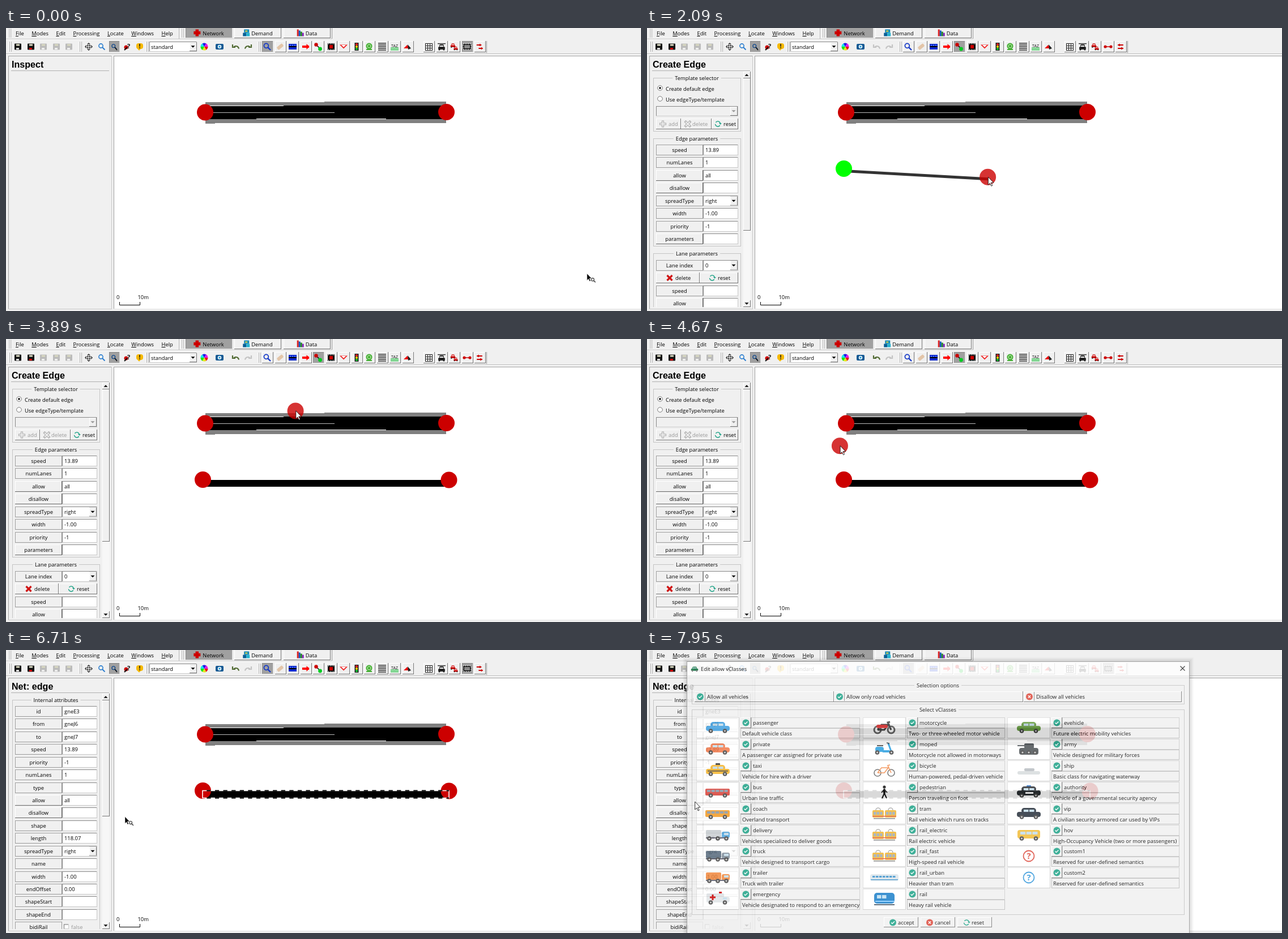
An HTML page with a canvas that plays this animation: 1121 by 500 pixels, repeating every 8000 ms.

```html
<!DOCTYPE html>
<html lang="en">
<head>
<meta charset="utf-8">
<title>Network editor</title>
<style>
html, body { margin: 0; width: 100%; height: 100%; overflow: hidden; background: #f0f0f0 }
canvas { display: block }
</style>
</head>
<body>
<canvas id="stage" width="1121" height="500"></canvas>
<script>
const LOOP = 8000, FACE = '#f0f0f0', GRAY = '#a0a0a0', RED = '#c00', TEAL = '#1fa388', INK = '#222';
const font = (size, family = 'Open Sans') => `${size}px "${family}", sans-serif`;
const UI = font(9.4);
const screen2d = document.getElementById('stage').getContext('2d');
let g = screen2d;

// ---- drawing helpers ----
const rect = (x, y, w, h, c) => { g.fillStyle = c; g.fillRect(x, y, w, h); };
const block = (x, y, w, h, c, r = 2) => { g.fillStyle = c; g.beginPath(); g.roundRect(x, y, w, h, r); g.fill(); };
const disc = (x, y, r, c) => { g.fillStyle = c; g.beginPath(); g.arc(x, y, r, 0, 7); g.fill(); };
const ring = (x, y, r, c, w = 1, from = 0, to = 7) => {
  g.strokeStyle = c; g.lineWidth = w; g.beginPath(); g.arc(x, y, r, from, to); g.stroke();
};
const trace = p => { g.beginPath(); for (let i = 0; i < p.length; i += 2) g.lineTo(p[i], p[i + 1]); };
const poly = (c, ...p) => { trace(p); g.fillStyle = c; g.fill(); };
const line = (c, w, ...p) => { trace(p); g.strokeStyle = c; g.lineWidth = w; g.stroke(); };
const text = (s, x, y, c = '#000', align = 'left', face = UI) => {
  g.font = face; g.textAlign = align; g.fillStyle = c; g.fillText(s, x, y + 3.5);
};
const at = (x, y, draw, sx = 1, sy = sx) => { g.save(); g.translate(x, y); g.scale(sx, sy); draw(); g.restore(); };
const repeat = (n, draw) => { for (let i = 0; i < n; i++) draw(i); };
const box = (x, y, w, h, fill, tl = GRAY, br = '#ccc') => {
  rect(x, y, w, h, br); rect(x, y, w - 1, h - 1, tl); rect(x + 1, y + 1, w - 2, h - 2, fill);
};
const button = (x, y, w, h, down) =>
  down ? box(x, y, w, h, GRAY, '#888', '#ddd') : box(x, y, w, h, FACE, '#fff', '#777');
const group = (title, x, y, w, h) => {
  g.strokeStyle = '#c4c4c4'; g.lineWidth = 1; g.strokeRect(x + .5, y + .5, w, h);
  g.font = UI;
  const gap = g.measureText(title).width + 8, cx = x + w / 2;
  rect(cx - gap / 2, y - 2, gap, 5, FACE);
  text(title, cx, y, '#000', 'center');
};
const triangle = (x, y, dir, c = '#000', r = 3.5) => poly(c, x - r, y - dir * r / 2, x + r, y - dir * r / 2, x, y + dir * r / 2);
const dropdown = (x, y, c) => { box(x, y - 8, 13, 16, FACE, '#fff', '#777'); triangle(x + 6, y, 1, c); };
const cross = (x, y, r, c, w) => { line(c, w, x - r, y - r, x + r, y + r); line(c, w, x - r, y + r, x + r, y - r); };
const plus = (x, y, r, c, w) => { line(c, w, x - r, y, x + r, y); line(c, w, x, y - r, x, y + r); };
const check = (x, y) => { disc(x, y, 6, TEAL); line('#fff', 1.3, x - 3, y, x - 1, y + 2, x + 3, y - 2); };
const refuse = (x, y) => { disc(x, y, 6, '#dc4a3d'); cross(x, y, 2.2, '#fff', 1.3); };
const reload = (x, y) => {
  ring(x, y, 4.5, TEAL, 1.5, .6, 3.1); ring(x, y, 4.5, TEAL, 1.5, 3.8, 6.2);
  triangle(x + 4.5, y, 1, TEAL, 2.5);
};

// ---- toolbar icons, drawn around their centre ----
const lens = (c, s = 1) => () => { ring(-1.5 * s, -1.5 * s, 3.6 * s, c, 1.6 * s); line(c, 2 * s, s, s, 5.5 * s, 5.5 * s); };
const floppy = (c, mark) => () => { block(-6, -5.5, 12, 11, c, 1); rect(-3, -4.5, 6, 3, '#d8d8c0'); rect(-3, 2, 5, 3, mark); };
const saved = floppy('#bbb', '#eee');
const arrow = (c, dir = 1) => () => { rect(-6, -2, 12, 4, c); at(4 * dir, 0, () => { g.rotate(-dir * Math.PI / 2); triangle(0, 0, 1, c, 5); }); };
const curl = (c, dir) => () => at(0, 0, () => { ring(1, 4, 5, c, 2.2, 3.7, 6.2); line(c, 2.2, -5, -4, -5, 1, 0, 1); }, dir, 1);
const vehicleIcon = c => () => { block(-6, -1, 12, 5, c); block(-4, -5, 8, 5, c); rect(-3, -3, 6, 2, '#fff'); disc(-4, 4, 1.6, INK); disc(4, 4, 1.6, INK); };
const stripes = (n, step, c) => repeat(n, i => rect(-7, (i - (n - 1) / 2) * step - .7, 14, 1.4, c));

const fileIcons = [floppy('#111', '#ddd'), floppy('#111', RED), saved, saved, saved];
const viewIcons = [
  () => { repeat(4, () => { g.rotate(Math.PI / 2); triangle(0, -5.5, -1, INK, 3); }); disc(0, 0, 3.5, INK); plus(0, 0, 5, '#fff', 1.2); },
  lens('#2d7fd0'),
  () => { box(-9, -10, 19, 20, GRAY, '#888', '#ddd'); lens('#124a8c', .8)(); line('#111', 1.5, 1, 1, 5, 6); },
  () => { disc(-2, 1, 3.5, RED); line('#111', 2, -5, 6, 0, 1); text('?', 0, -1, '#111', 'left', 'bold ' + font(11)); },
  () => { block(-6, -6, 12, 10, '#f5b800', 4); triangle(-1, 5, 1, '#f5b800'); rect(-.8, -5, 1.6, 5, INK); disc(0, 2, 1, INK); },
];
const modeIcons = [
  lens('#1438c8', 1.1),
  () => { g.rotate(-.7); block(-6, -3, 12, 6, '#e3c5a8'); },
  () => { rect(-7, -5, 14, 10, '#0a2ad0'); rect(-7, -1, 14, 2, '#000'); repeat(3, i => rect(i * 4 - 5, -3, 2, 1, '#8af')); },
  arrow('#f00'),
  () => { line('#000', 1.5, -4, -4, 4, 4); disc(-3.5, -3.5, 3.2, RED); disc(3.5, 4, 3.4, '#0c2'); },
  () => { rect(-6, -6, 12, 12, '#000'); rect(-3, -3, 6, 6, RED); repeat(4, i => { rect(i * 3 - 5, -6, 1, 2, '#fff'); rect(i * 3 - 5, 4, 1, 2, '#fff'); }); },
  () => { triangle(0, 0, 1, '#e22', 7); triangle(0, -1, 1, '#fff', 4); },
  () => { rect(-3.5, -7, 7, 14, INK); ['#f22', '#fd0', '#1c3'].forEach((c, i) => disc(0, i * 4 - 4, 2, c)); },
  () => { disc(0, -1, 5.5, '#45b035'); ring(0, -1, 3, '#d4f0c4', 1); rect(-5, 4, 10, 2, '#45b035'); },
  () => stripes(5, 3, INK),
  () => { text('TAZ', 0, -3, '#111', 'center', font(7)); at(0, 4, () => stripes(2, 3, '#1b3')); },
  () => { triangle(-1, 0, -1, '#e11', 6); poly(INK, 0, -4, 6, 3, 1, 5); },
];
const gridIcons = [
  () => repeat(4, i => { rect(i * 4 - 6, -6, 1, 13, INK); rect(-6, i * 4 - 6, 13, 1, INK); }),
  () => { at(0, 1, vehicleIcon(INK)); rect(-7, -6, 14, 1.3, INK); },
  () => { at(-2, -2, vehicleIcon(RED), .7); at(3, 3, vehicleIcon(RED), .6); },
];
const inspectIcons = [
  () => { rect(-7, -5, 14, 10, '#111'); rect(-5, -3, 10, 6, '#888'); g.setLineDash([2, 2]); g.strokeStyle = '#fff'; g.lineWidth = 1; g.strokeRect(-7, -5, 14, 10); },
  () => { at(-1, -3, arrow(RED), .7, .5); at(2, 3, arrow(RED), .6, .5); },
];
const edgeIcons = [
  () => { line(RED, 1.5, -5, 0, 5, 0); disc(-5, 0, 2.6, RED); disc(5, 0, 2.6, RED); },
  () => { at(0, -3, arrow(RED, -1), .8, .5); at(0, 3, arrow(RED), .8, .5); },
];
const colorWheel = () => repeat(6, i => {
  g.fillStyle = `hsl(${i * 60}, 80%, 50%)`; g.beginPath(); g.moveTo(0, 0); g.arc(0, 0, 6.5, i * 1.047, i * 1.047 + 1.06); g.fill();
});
const camera = () => { block(-7, -5, 14, 10, '#155a94'); disc(0, 0, 3.2, '#fff'); disc(0, 0, 1.8, '#29a3dc'); };
const tabs = {
  Network: () => plus(0, 0, 6, RED, 5.5),
  Demand: () => { rect(-3, -6, 9, 6, '#1188b8'); rect(-5, 0, 6, 6, '#0a5f96'); rect(1, 0, 6, 6, '#25b2cf'); rect(-1, -4, 4, 2, '#ffd83a'); },
  Data: () => ['#d22', '#15b', '#282', '#82b'].forEach((c, i) => rect(i * 3 - 5, i * 2 - 6, 3, 12 - i * 2, c)),
};
const grip = (x, y, h) => repeat(2, i => { rect(x + i * 3, y, 1, h, '#fff'); rect(x + i * 3 + 1, y, 1, h, '#aaa'); });
const iconRow = (x, icons, active) => icons.forEach((draw, i) => {
  const cx = Math.round(x + i * 22.5);
  if (active !== undefined) button(cx - 9, 23, 20, 20, i === active);
  at(cx, 33, draw);
});

function drawToolbars(creating, canUndo, canRedo) {
  rect(0, 0, 1121, 500, FACE);
  rect(0, 19, 575, 1, '#c8c8c8'); rect(0, 20, 575, 1, '#fff');
  rect(0, 45, 1121, 1, '#b8b8b8'); rect(0, 46, 1121, 1, '#fff');
  grip(4, 1, 16); grip(309, 1, 16); rect(305, 0, 1, 19, '#b8b8b8'); rect(575, 0, 1, 19, '#999');
  for (const x of [5, 129, 247, 445]) grip(x, 24, 18);
  rect(848, 23, 1, 21, '#999');
  let menuX = 17;
  for (const s of ['File', 'Modes', 'Edit', 'Processing', 'Locate', 'Windows', 'Help']) {
    text(s, menuX, 9); rect(menuX, 14, g.measureText(s[0]).width, 1, '#000');
    menuX += g.measureText(s).width + 13.5;
  }
  Object.entries(tabs).forEach(([s, icon], i) => {
    const x = Math.round(317 + i * 86.4), cx = x + 49;
    button(x, -1, 83, 19, !i);
    text(s, cx, 9, '#000', 'center');
    at(cx - g.measureText(s).width / 2 - 10, 8.5, icon);
  });
  iconRow(21, fileIcons); iconRow(146, viewIcons);
  box(253, 24, 84, 18, '#fff', '#888'); text('standard', 256, 33); dropdown(324, 33);
  at(350, 33, colorWheel); at(377, 33, camera);
  const undoColor = on => on ? '#526b34' : '#c4c4c4';
  iconRow(405, [curl(undoColor(canUndo), 1), curl(undoColor(canRedo), -1)]);
  iconRow(461, modeIcons, creating ? 4 : 0);
  iconRow(746, [...gridIcons, ...(creating ? edgeIcons : inspectIcons)], creating ? -1 : 3);
}

// ---- side panel ----
function row(y, label, value = '', kind = '', down = false) {
  const raised = kind === 'button' && !down;
  box(16, y - 9.5, 83, 19, FACE, raised ? '#fff' : GRAY, raised ? '#666' : '#999');
  text(label, 57.5 + down, y + down, '#000', 'center');
  if (kind === 'check') { box(102, y - 5, 9, 9, '#fff', '#777'); text(value, 115, y, '#999'); return; }
  box(99, y - 9.5, 62, 19, '#fff', '#888', '#c8c8c8');
  text(value, 103, y);
  if (kind === 'combo') dropdown(147, y);
}
const rows = (y, list, pressed) => list.forEach((entry, i) => {
  const [label, value, kind] = entry.split('|');
  row(Math.round(y + i * 22.43) + .5, label, value, kind, label === pressed);
});
function createPanel() {
  group('Template selector', 11, 88, 154, 94);
  ['Create default edge', 'Use edgeType/template'].forEach((s, i) => {
    const y = 107 + i * 19;
    disc(23, y - 1, 4.5, '#fff'); ring(23, y - 1, 4.3, '#777'); if (!i) disc(23, y - 1, 1.8, '#000');
    text(s, 33, y);
  });
  box(16, 138, 145, 18, FACE, '#888'); dropdown(147, 147, '#999');
  button(16, 160, 44, 19); button(60, 160, 54, 19); button(114, 160, 47, 19);
  for (const [w, c] of [[4, '#aaa'], [2, '#eee']]) { plus(28, 169.5, 4 + w / 2, c, w); cross(72, 169.5, 3 + w / 2, c, w); }
  reload(125, 169.5);
  text('add', 38, 169.5, '#999'); text('delete', 80, 169.5, '#999'); text('reset', 135, 169.5);
  group('Edge parameters', 11, 195, 154, 190);
  rows(215, ['speed|13.89', 'numLanes|1', 'allow|all|button', 'disallow||button', 'spreadType|right|combo', 'width|-1.00', 'priority|-1', 'parameters||button']);
  group('Lane parameters', 11, 398, 154, 130);
  rows(419, ['Lane index|0|combo']);
  button(16, 432, 77, 19); button(93, 432, 68, 19);
  cross(40, 441.5, 4.5, '#d01515', 3.2); reload(115, 441.5);
  text('delete', 50, 441.5); text('reset', 125, 441.5);
  rows(463.6, ['speed', 'allow||button']);
}
function edgePanel(pressed) {
  group('Internal attributes', 11, 88, 154, 440);
  rows(108, ['id|gneE3', 'from|gneJ6', 'to|gneJ7', 'speed|13.89', 'priority|-1', 'numLanes|1', 'type', 'allow|all|button', 'disallow||button',
    'shape', 'length|118.07', 'spreadType|right|combo', 'name', 'width|-1.00', 'endOffset|0.00', 'shapeStart', 'shapeEnd', 'bidiRail|false|check'], pressed);
}
function drawPanel(creating, selected, pressed) {
  box(4, 49, 183, 448, FACE, GRAY, '#c8c8c8');
  text(creating ? 'Create Edge' : selected ? 'Net: edge' : 'Inspect', 10, 66.5, '#000', 'left', 'bold ' + font(16.1, 'Liberation Sans'));
  rect(9, 75, 173, 1, '#b0b0b0');
  if (!creating && !selected) return;
  g.save(); g.beginPath(); g.rect(5, 77, 181, 416); g.clip();
  creating ? createPanel() : edgePanel(pressed);
  rect(170, 77, 13, 416, '#f7f7f7');
  button(170, 77, 13, 12); triangle(176, 83, -1);
  button(170, 89, 13, creating ? 269 : 205);
  button(170, 481, 13, 12); triangle(176, 487, 1);
  g.restore();
}

// ---- network view ----
const NODE_R = 14.5, START = [347.5, 248.5], END = [782, 249];
const node = (x, y, c = RED) => disc(x, y, NODE_R, c);
function drawNetwork(drawing, built, selected, x, y) {
  box(190, 49, 932, 448, '#fff', GRAY, '#e3e3e3');
  rect(352, 131, 425, 37, '#808080'); rect(562, 130, 215, 1, '#808080'); rect(352, 168, 17, 1, '#808080');
  rect(352, 137, 425, 24, '#000');
  rect(352, 137, 138, 1, '#fff'); rect(442, 160, 229, 1, '#fff'); rect(365, 149, 215, 1, '#bbb');
  node(351.5, 149); node(777.5, 148.5);
  if (drawing) { line('#333', 5, START[0], START[1] + 4, x, y + 3.5); node(...START, '#0f0'); }
  if (built) { rect(347, 249, 435, 12, '#000'); node(...START); node(...END); }
  if (selected) {
    g.strokeStyle = '#fff'; g.lineWidth = 1.6; g.strokeRect(347, 248.5, 435, 13);
    g.setLineDash([7.3, 7.3]); g.lineDashOffset = -7.3;
    for (const edgeY of [248.5, 261.5]) line('#000', 2, 347, edgeY, 782, edgeY);
    g.setLineDash([]);
  }
  line('#000', 1, 200.5, 484, 200.5, 489.5, 236.5, 489.5, 236.5, 484);
  text('0', 195, 475.5); text('10m', 232.5, 475.5);
}
function drawCursor(x, y, inspecting) {
  at(x + .7, y, () => {
    if (inspecting) at(11, 11.5, lens('#333', .7));
    const s = inspecting ? .85 : 1;
    g.scale(s, s);
    const shape = [0, 0, 0, 14, 3, 11, 5.5, 16, 7.5, 15, 5, 10, 9.5, 10, 0, 0];
    poly(inspecting ? '#000' : '#fff', ...shape);
    line(inspecting ? '#fff' : '#000', inspecting ? .5 : .8, ...shape);
  });
}

// ---- vehicle class dialog: every vehicle is built from blocks, panes and wheels ----
const GLASS = '#c4dcea';
const wheels = (n = 2, span = 25) => repeat(n, i => { const x = span * (i / (n - 1) - .5); disc(x, 6, 3.8, '#444'); disc(x, 6, 1.6, '#ccc'); });
const panes = (n, x, y, w, h, c = GLASS) => repeat(n, i => rect(x + i * w / n, y, w / n - 1.5, h, c));
const car = c => { block(-21, -3, 42, 9, c, 4); block(-13, -10, 26, 10, c, 5); panes(2, -9, -7, 20, 4); wheels(); };
const truck = (cargo, cab) => { block(-21, -9, 27, 13, cargo); block(7, -6, 14, 11, cab, 3); rect(11, -4, 8, 4, GLASS); rect(-21, 4, 40, 2, '#556'); wheels(3, 30); };
const vehicles = {
  car,
  taxi(c) { block(-4, -13, 8, 4, '#333', 1); car(c); rect(-18, 0, 36, 1.5, '#333'); },
  police(c) { block(-4, -12, 8, 3, '#37c', 1); car(c); rect(-6, 0, 14, 3, '#fff'); },
  bus(c) { block(-22, -6, 43, 12, c); panes(5, -19, -4, 38, 4, '#8595a5'); wheels(); },
  van(c) { block(-20, -9, 40, 15, c, 4); panes(3, -15, -6, 32, 5); wheels(); },
  delivery(c) { truck('#c9ced2', c); },
  truck(c) { truck(c, '#7f8d9b'); },
  trailer(c) { truck(c, c); },
  ambulance() { block(-20, -10, 31, 16, '#e0e4e7'); block(5, -4, 16, 10, '#e0e4e7', 4); plus(-9, -3, 5, RED, 3); rect(9, -3, 7, 4, GLASS); rect(2, -13, 5, 3, RED); wheels(); },
  cycle(c, w = 1.6) { for (const x of [-12, 12]) ring(x, 4, 6, '#666', w); line(c, w, -12, 4, -5, -5, 7, -5, 0, 4, -12, 4); line(c, w, 12, 4, 6, -9, 10, -10); },
  motor(c) { this.cycle('#444', 3); block(-14, -5, 20, 6, c, 3); },
  moped(c) { block(-16, -4, 15, 9, c, 4); block(-4, 2, 14, 4, c); line(c, 3, 7, -10, 12, 4); rect(-13, -7, 11, 2, '#444'); line('#444', 1.5, 4, -11, 9, -10); wheels(); },
  person() { disc(0, -9, 2.6, '#111'); block(-2, -6, 4, 9, '#111'); line('#111', 2, -4, 11, 0, 2, 4, 11); line('#111', 1.6, -5, 1, 0, -5, 5, 1); },
  tram(c) { for (const x of [-21, 1]) { block(x, -6, 20, 13, c); panes(3, x + 2, -3, 17, 5, '#9ab'); ring(x + 10, -6, 4, '#777', 1, 3.1, 6.3); } rect(-21, 4, 42, 1.5, '#d54'); rect(-19, 8, 38, 1.5, '#777'); },
  urban(c) { block(-25, -6, 50, 12, '#dde6eb', 4); panes(7, -21, -3, 42, 3, c); rect(-24, 3, 48, 1.5, c); },
  rail(c) { block(-18, -11, 36, 19, c, 5); panes(2, -13, -7, 18, 6, '#bfe0f3'); rect(-16, 3, 34, 2, '#8cf'); rect(-18, 9, 36, 2, '#456'); },
  tank(c) { block(-17, -2, 34, 12, c, 4); block(-8, -10, 17, 9, c); rect(-20, -7, 14, 2, c); wheels(3, 22); },
  ship(c) { block(-20, 1, 40, 6, c, 3); block(-8, -4, 18, 5, '#b9bec2'); },
  custom(c) { ring(0, 0, 9.5, c, 1.8); text('?', 0, 1.5, c, 'center', 'bold ' + font(15)); },
};
const classes = [
  [87, 376, `passenger|Default vehicle class|car|#3f9fe0
private|A passenger car assigned for private use|car|#f27a4b
taxi|Vehicle for hire with a driver|taxi|#f5b52b
bus|Urban line traffic|bus|#dd4339
coach|Overland transport|bus|#f29a22
delivery|Vehicles specialized to deliver goods|delivery|#4ba3dc
truck|Vehicle designed to transport cargo|truck|#56697c
trailer|Truck with trailer|trailer|#f0883d
emergency|Vehicle designated to respond to an emergency|ambulance|#fff`],
  [381, 632, `motorcycle|Two- or three-wheeled motor vehicle|motor|#d33
moped|Motorcycle not allowed in motorways|moped|#2b9fe0
bicycle|Human-powered, pedal-driven vehicle|cycle|#f28a4a
pedestrian|Person traveling on foot|person|#111
tram|Rail vehicle which runs on tracks|tram|#f2b632
rail_electric|Rail electric vehicle|tram|#f2b632
rail_fast|High-speed rail vehicle|tram|#f2b632
rail_urban|Heavier than tram|urban|#3c92cc
rail|Heavy rail vehicle|rail|#1c7fc9`],
  [636, 940, `evehicle|Future electric mobility vehicles|car|#6a9f45
army|Vehicle designed for military forces|tank|#4d5357
ship|Basic class for navigating waterway|ship|#d8dcde
authority|Vehicle of a governmental security agency|police|#2b2f33
vip|A civilian security armored car used by VIPs|car|#26303c
hov|High-Occupancy Vehicle (two or more passengers)|van|#f2bd3a
custom1|Reserved for user-defined semantics|custom|#dc4a3d
custom2|Reserved for user-defined semantics|custom|#3498db`],
];
const DIALOG = { x: 70, y: 20, w: 888, h: 490 };
function makeDialog() {
  const layer = document.createElement('canvas');
  layer.width = 1121; layer.height = 500;
  g = layer.getContext('2d');
  const { x: left, y: top, w, h } = DIALOG;
  repeat(7, i => { g.strokeStyle = `rgba(0,0,0,${.14 - i * .02})`; g.strokeRect(left - i - .5, top - i - .5, w + 2 * i + 1, h); });
  box(left, top, w, h, FACE, '#999', '#999'); rect(left + 1, top + 1, w - 2, 24, '#fff');
  at(84, 34, () => car('#174'), .3, .45);
  text('Edit allow vClasses', 95, 33); cross(945.5, 32.5, 4, INK, 1.1);
  group('Selection options', 79, 62, 869, 33);
  [['Allow all vehicles', 84, 330, check], ['Allow only road vehicles', 330, 664, check], ['Disallow all vehicles', 665, 944, refuse]].forEach(([s, x, right, icon]) => {
    button(x, 73, right - x, 19); rect(x + 18, 74, 1, 16, '#888');
    icon(x + 10, 82.5); text(s, x + 22, 82.5);
  });
  group('Select vClasses', 79, 105, 869, 362);
  for (const [x, right, list] of classes) list.split('\n').forEach((entry, i) => {
    const [name, about, kind, color] = entry.split('|'), y = Math.round(119 + i * 37.9);
    box(x, y, 76, 37, '#fff', '#ddd', '#ccc');
    at(x + 38, y + 18, () => vehicles[kind](color));
    button(x + 78, y, 19, 19); check(x + 87.5, y + 9.5);
    box(x + 97, y, right - x - 97, 19, FACE, '#ccc', '#ccc'); text(name, x + 100, y + 9.5);
    box(x + 78, y + 19, right - x - 78, 18, FACE, '#bbb', '#bbb'); text(about, x + 81, y + 28.5);
  });
  Object.entries({ accept: check, cancel: refuse, reset: reload }).forEach(([s, icon], i) => {
    const x = 418 + i * 65;
    button(x, 472, 61, 18); icon(x + 16, 481.5); text(s, x + 25, 481.5);
  });
  g = screen2d;
  return layer;
}
const dialog = makeDialog();

const STEP = 78, PHASE = 62, HOME = [1025, 434];
const moves = [
  { from: 20, until: 290, to: [555, 23], bend: 0 },
  { from: 670, until: 1550, to: START, bend: -19 },
  { from: 1600, until: 2490, to: [788, 237], bend: 22 },
  { from: 2500, until: 2710, to: END, bend: 0 },
  { from: 3490, until: 4163, to: [335, 205], bend: 103 },
  { from: 4290, until: 4830, to: [342, 184], bend: 0 },
  { from: 4990, until: 5440, to: [477.5, 241], bend: 0 },
  { from: 5450, until: 5610, to: [479, 257], bend: 0 },
  { from: 6150, until: 7016, to: [84, 268], bend: -36 },
];
function pointerAt(time) {
  const t = PHASE + Math.floor((time - PHASE) / STEP) * STEP;
  let [x, y] = HOME;
  for (const { from, until, to, bend } of moves) {
    if (t <= from) break;
    const u = Math.min((t - from) / (until - from), 1), k = u * u * (3 - 2 * u);
    const dx = to[0] - x, dy = to[1] - y, side = bend * Math.sin(Math.PI * k) / Math.hypot(dx, dy);
    x += dx * k - dy * side;
    y += dy * k + dx * side;
  }
  return [x, y];
}

function frame() {
  const t = performance.now() % LOOP, [x, y] = pointerAt(t);
  const creating = t >= 610 && t < 5610, drawing = t >= 1690 && t < 3190;
  const selected = t >= 6150, inView = x > 190 && y > 49;
  drawToolbars(creating, !drawing, t < 1690);
  drawPanel(creating, selected, t >= 7570 && t < 7730 ? 'allow' : '');
  drawNetwork(drawing, t >= 3190, selected, x, y);
  if (creating && inView) node(x, y, 'rgba(204,0,0,.8)');
  if (t >= 7870) {
    g.globalAlpha = t < 7950 ? .4 : .85;
    g.drawImage(dialog, 0, 0);
    g.globalAlpha = 1;
  }
  drawCursor(x, y, inView && !creating);
  requestAnimationFrame(frame);
}
frame();
</script>
</body>
</html>
```
